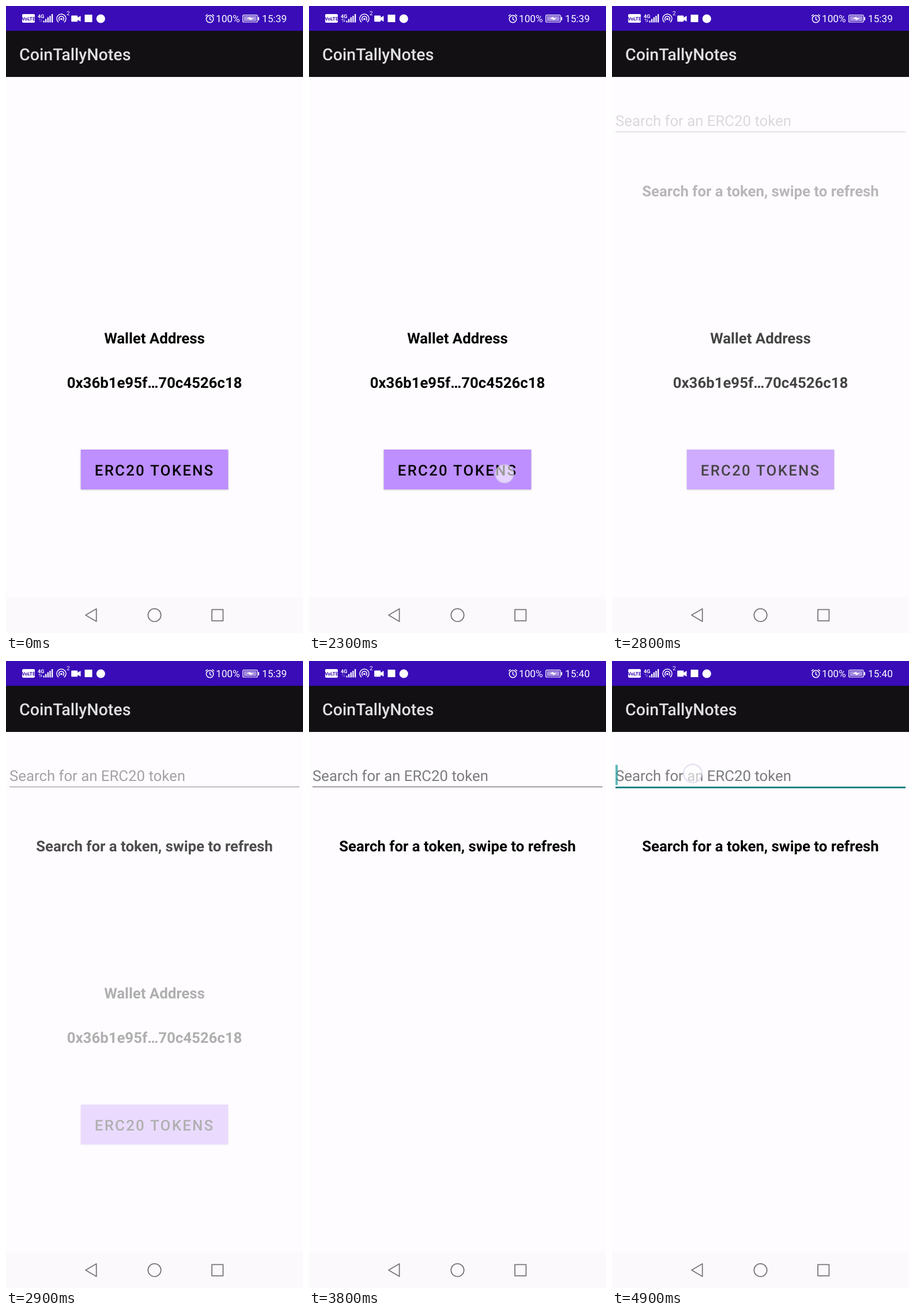
These frames come from a looping animation (515 px wide and 1087 px high, 5 s). An HTML page:

```html
<!DOCTYPE html>
<html lang="en">
<head>
<meta charset="utf-8">
<title>Wallet app</title>
<style>
  html, body { margin: 0; width: 100%; height: 100%; overflow: hidden; background: #fefcfe; }
  svg { display: block; width: 100%; height: 100%; }
  text { font-family: Roboto, sans-serif; font-size: 25.75px; text-rendering: geometricPrecision; }
  .bold { font-weight: 700; text-anchor: middle; }
  .line { fill: none; stroke: #fff; stroke-width: 1.5; }
  #button { filter: drop-shadow(0 1.5px 1.5px rgba(0, 0, 0, .22)); }
</style>
</head>
<body>
<svg viewBox="0 0 515 1087">
  <rect width="515" height="1087" fill="#fefcfe"/>
  <rect width="515" height="43" fill="#390cb7"/>
  <rect y="43" width="515" height="80" fill="#121013"/>
  <text x="23" y="94" fill="#e0dfe0" style="font-size:28.6px;font-weight:500">CoinTallyNotes</text>

  <!-- status bar -->
  <g fill="#fff">
    <rect x="28" y="14" width="22" height="15" rx="2"/>
    <text x="39" y="25" fill="#390cb7" style="font-size:8.2px;font-weight:700;text-anchor:middle">VoLTE</text>
    <text x="55" y="20.5" style="font-size:9px;font-weight:700">4G</text>
    <path id="arrows" d="M58 28V24H56.2L58.5 21.5V28ZM60.5 22H61.2V25.5H63.2L60.5 28Z"/>
    <path d="M64.5 25.5h2.2v3h-2.2zM68 22.5h2.3v6H68zM71.7 19.5H74v9h-2.3zM75.3 17h2.3v11.5h-2.3zM79 14h2.3v14.5H79z"/>
    <path class="line" d="M91 28.2A8 8 0 1 1 101 28.2M93.3 25.4A4.3 4.3 0 1 1 98.7 25.4"/>
    <circle cx="96" cy="22.5" r="1.8"/>
    <text x="105" y="16.3" style="font-size:10px">2</text>
    <path d="M114.5 16.5H123a1.3 1.3 0 0 1 1.3 1.3V20L129.5 17V27L124.3 24V26a1.3 1.3 0 0 1-1.3 1.3H114.5a1.3 1.3 0 0 1-1.3-1.3V17.8a1.3 1.3 0 0 1 1.3-1.3Z"/>
    <rect x="136.5" y="15" width="13" height="13"/>
    <circle cx="164.3" cy="22" r="7.6"/>
    <circle class="line" cx="353.5" cy="22.5" r="6.2"/>
    <path class="line" d="M353.5 18.5V23L356.5 25M346 17.5L349.5 14.5M361 17.5L357.5 14.5"/>
    <text x="364" y="28" style="font-size:17.2px">100%</text>
    <rect class="line" x="410.6" y="15.6" width="25.5" height="12.4" rx="2" style="stroke-width:1.2"/>
    <rect x="412.3" y="17.3" width="22" height="9" fill="#a78fe0"/>
    <path d="M417.5 21.8L424 18.8L423.6 21H429.5L423 25L423.4 22.8Z"/>
    <rect x="437" y="19" width="2" height="6" rx="1"/>
    <text id="clock" x="444" y="28" style="font-size:17.2px">15:39</text>
  </g>

  <g id="wallet">
    <text class="bold" x="257.5" y="585">Wallet Address</text>
    <text class="bold" x="257.5" y="662">0x36b1e95f…70c4526c18</text>
    <rect id="button" x="129.7" y="769" width="255.6" height="69" fill="#bd8fff"/>
    <text x="153.8" y="814" style="font-weight:500;letter-spacing:.0893em">ERC20 TOKENS</text>
  </g>

  <g id="search">
    <text x="6" y="208" fill="#7c7b7e">Search for an ERC20 token</text>
    <rect id="underline" x="6" width="503"/>
    <rect id="caret" x="6" y="180" width="4" height="35" fill="#2ba3a3" opacity=".75"/>
    <text class="bold" x="257.5" y="330">Search for a token, swipe to refresh</text>
  </g>

  <circle id="touch" r="15.8" fill="#fff" fill-opacity=".6" stroke="#cfc6e6" stroke-opacity=".6" stroke-width="2"/>

  <!-- navigation bar -->
  <rect y="1025" width="515" height="62" fill="#fbf9fb"/>
  <g fill="none" stroke="#77767a" stroke-width="1.8" stroke-linejoin="round">
    <path d="M138 1056L156.7 1045V1067Z"/>
    <circle cx="257.5" cy="1056" r="11.2"/>
    <rect x="357" y="1046.4" width="19.4" height="19.4"/>
  </g>
</svg>
<script>
const LOOP = 5000, STEP = 100, FADE_START = 2675, FADE_TIME = 360;
const el = id => document.getElementById(id);
const set = (id, attrs) => {
  for (const key in attrs) el(id).setAttribute(key, attrs[key]);
};
const between = (t, from, to) => t >= from && t < to;

function draw(now) {
  const t = Math.floor(now % LOOP / STEP) * STEP;

  // cross-fade between the two screens
  const p = Math.min(1, Math.max(0, (t - FADE_START) / FADE_TIME));
  const shown = (1 - Math.cos(Math.PI * p)) / 2;
  set('wallet', { opacity: 1 - shown });
  set('search', { opacity: shown });

  const tapButton = between(t, 2300, 2500), tapField = t >= 4800, focused = t >= 4900;
  set('touch', {
    cx: tapButton ? 339 : 140,
    cy: tapButton ? 811 : 195,
    opacity: tapButton || tapField ? 1 : 0
  });
  set('underline', {
    y: focused ? 217.8 : 217.5,
    height: focused ? 2.8 : 1.4,
    fill: focused ? '#0b7a7d' : '#7c7b7e'
  });
  set('caret', { visibility: focused ? 'visible' : 'hidden' });

  set('arrows', { opacity: between(t, 1000, 3500) || between(t, 100, 200) ? 1 : .45 });
  el('clock').textContent = t < 3800 ? '15:39' : '15:40';
}

const start = performance.now();
function tick() {
  draw(performance.now() - start);
  requestAnimationFrame(tick);
}
tick();
</script>
</body>
</html>
```
